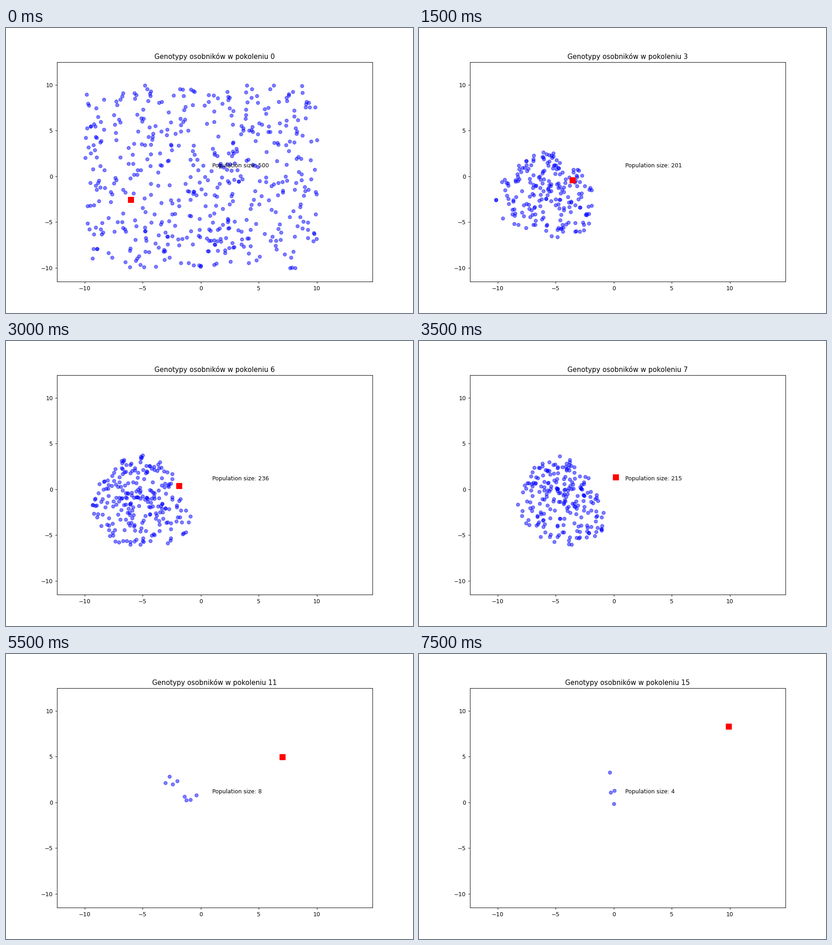
Recreate the animation shown at these times as a matplotlib script. Size 894 by 626 pixels, loop 8000 ms.

```python
import numpy as np
import matplotlib.pyplot as plt
from matplotlib.animation import FuncAnimation

DPI = 89.4
STEP_MS = 500
GENERATIONS = 16
FINAL_PHASE = 11  # from here on only a handful of individuals is left

# Key generations; values in between are interpolated
SIZE = ([0, 1, 4, 6, 9, 11, 15], [500, 86, 259, 236, 174, 8, 4])
BEST_GEN = [0, 1, 4, 6, 9, 10, 11, 13, 15]
BEST_X = [-6.02, -5.70, -2.50, -1.86, 4.28, 7.12, 7.03, 9.58, 9.88]
BEST_Y = [-2.52, -2.40, 0.63, 0.40, 3.20, 4.20, 4.98, 7.00, 8.33]

# Shape of the cloud: centre, radii and slope
CLOUD_GEN = [1, 4, 6, 9, 11]
CLOUD = dict(cx=[-6.0, -5.8, -5.1, -3.5, -1.75],
             cy=[-2.2, -2.0, -1.3, -0.9, 1.40],
             rx=[4.3, 4.2, 4.1, 2.7, 1.40],
             ry=[4.0, 5.2, 5.2, 4.0, 0.70],
             slope=[0.0, -0.1, -0.1, -0.5, -0.80])
TAPER = 0.25

# The last individuals drift from START towards END
START = np.array([(-3.04, 2.14), (-2.42, 1.99), (-2.69, 2.82), (-1.26, 0.24),
                  (-0.38, 0.80), (-1.40, 0.67), (-2.03, 2.33), (-0.90, 0.32)])
END = np.array([(-0.28, 1.10), (0.04, 1.28), (-0.34, 3.29), (0.00, -0.13)])

rng = np.random.default_rng(15)


def cloud(gen, n):
    """Random points in a tilted ellipse, wider at the bottom."""
    c = {key: np.interp(gen, CLOUD_GEN, vals) for key, vals in CLOUD.items()}
    r = rng.random(n) ** 0.6
    angle = rng.uniform(0, 2 * np.pi, n)
    u, v = r * np.cos(angle), r * np.sin(angle)
    dx = c["rx"] * u * (1 - TAPER * v)
    return np.column_stack([c["cx"] + dx,
                            c["cy"] + c["ry"] * v + c["slope"] * dx])


def population(gen):
    n = round(np.interp(gen, *SIZE))
    if gen == 0:
        return rng.uniform(-10, 10, (n, 2))
    if gen < FINAL_PHASE:
        return cloud(gen, n)
    t = (gen - FINAL_PHASE) / (GENERATIONS - 1 - FINAL_PHASE)
    goal = END[np.arange(n) % len(END)]
    return START[:n] + t * (goal - START[:n])


populations = [population(gen) for gen in range(GENERATIONS)]

fig, ax = plt.subplots(figsize=(10, 7.0023), dpi=DPI)
ax.set_xlim(-12.39, 14.78)
ax.set_ylim(-11.50, 12.48)
ax.set_xticks(range(-10, 11, 5))
ax.set_yticks(range(-10, 11, 5))

dots = ax.scatter([], [], c="blue", alpha=0.5)
best = ax.scatter([], [], c="red", marker="s", s=100)
label = ax.text(1, 1, "")
title = ax.set_title("")


def draw(gen):
    pop = populations[gen]
    dots.set_offsets(pop)
    best.set_offsets([(np.interp(gen, BEST_GEN, BEST_X),
                       np.interp(gen, BEST_GEN, BEST_Y))])
    label.set_text(f"Population size: {len(pop)}")
    title.set_text(f"Genotypy osobników w pokoleniu {gen}")
    return dots, best, label, title


anim = FuncAnimation(fig, draw, frames=GENERATIONS, interval=STEP_MS,
                     repeat=True, repeat_delay=0)
plt.show()
```
